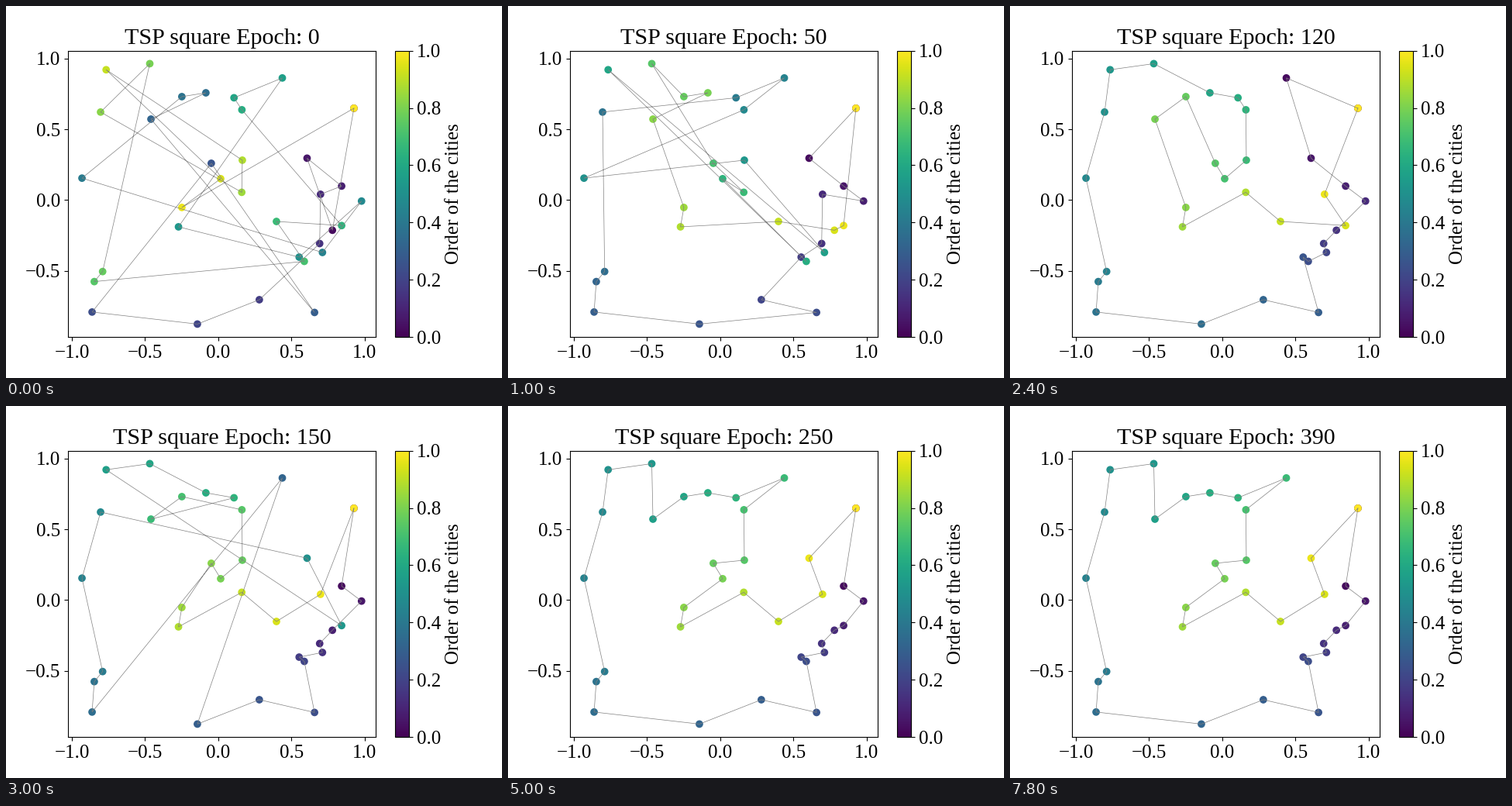
Recreate the animation shown at these times as a matplotlib script. Size 640 by 480 pixels, loop 8000 ms.

```python
import numpy as np
import matplotlib.pyplot as plt
from matplotlib.animation import FuncAnimation

plt.rcParams["font.family"] = "Liberation Serif"
plt.rcParams["font.size"] = 18

FRAMES, INTERVAL, EPOCH_STEP = 40, 200, 10

CITIES = {
    "A": (-.766, .921), "B": (-.468, .964), "C": (-.804, .622), "D": (-.249, .731),
    "E": (-.085, .758), "F": (-.460, .572), "G": (.107, .723), "H": (.161, .638),
    "I": (.437, .863), "J": (.926, .649), "K": (-.931, .155), "L": (-.048, .260),
    "M": (.016, .151), "N": (.160, .055), "O": (.164, .282), "P": (.606, .296),
    "Q": (.842, .099), "R": (.698, .041), "S": (.978, -.007), "T": (-.249, -.052),
    "U": (-.272, -.189), "V": (.397, -.151), "W": (.779, -.213), "X": (.842, -.180),
    "Y": (.692, -.307), "Z": (.711, -.370), "a": (.552, -.403), "b": (.587, -.433),
    "c": (.280, -.704), "d": (.657, -.794), "e": (-.143, -.876), "f": (-.862, -.791),
    "g": (-.847, -.576), "h": (-.790, -.505),
}
NAMES = list(CITIES)
XY = np.array([CITIES[n] for n in NAMES])

# Visiting order reached at certain epochs
TOURS = {
    0: "JWPQRYcefLdFEDKZSaUIGHXVbghBCNOAMT",
    20: "JPQSRaYcdefghCGHOMNLKABDEFTUVZXWbI",
    80: "JIPQSRYbaZdcefghKCAGHONMLEDBFTUVWX",
    120: "JIPQSWYZbadcefghKCABEGHOMLDFTUNVXR",
    180: "JQSXWYZabdcefghKCFABDEGIHOMLTUNVRP",
    250: "JQSXWYZabdcefghKCABFDEGIHOLMTUNVRP",
}
EPOCHS = list(TOURS)
RANKS = np.array([[tour.index(n) for n in NAMES] for tour in TOURS.values()])


def route(epoch):
    """Closed path through the cities, sorted by their interpolated ranks."""
    ranks = [np.interp(epoch, EPOCHS, r) for r in RANKS.T]
    order = np.argsort(ranks, kind="stable")
    return XY[np.append(order, order[0])]


fig, ax = plt.subplots(figsize=(6.4, 4.8), dpi=100)
start = route(0)
dots = ax.scatter(*start.T, c=np.linspace(0, 1, len(start)), cmap="viridis")
line, = ax.plot(*start.T, color="gray", linewidth=0.5)
fig.colorbar(dots, ax=ax, label="Order of the cities")
title = ax.set_title("")


def update(i):
    epoch = i * EPOCH_STEP
    path = route(epoch)
    dots.set_offsets(path)
    line.set_data(*path.T)
    title.set_text(f"TSP square Epoch: {epoch}")
    return dots, line, title


anim = FuncAnimation(fig, update, frames=FRAMES, interval=INTERVAL,
                     repeat=True, repeat_delay=0)
plt.show()
```
